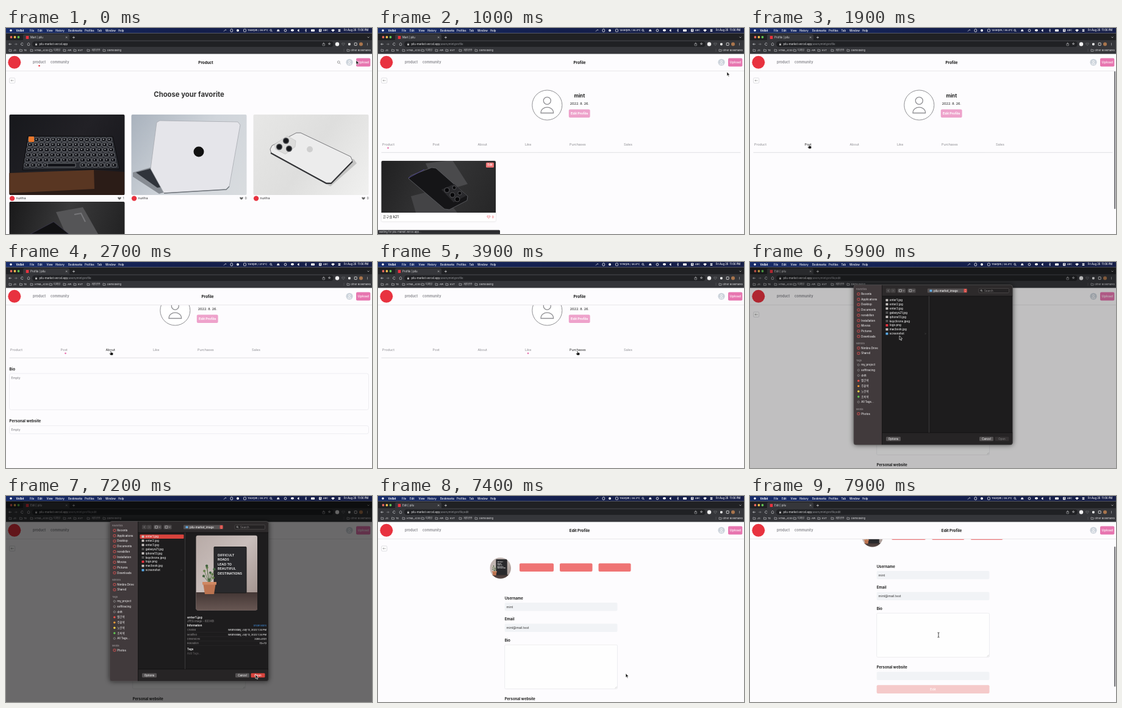
An HTML page with a canvas for the animation above (8 s loop, 600 px wide and 338 px high).

```html
<!DOCTYPE html>
<html lang="en">
<head>
<meta charset="utf-8">
<title>Market walkthrough</title>
<style>
html, body { margin: 0; width: 100%; height: 100%; overflow: hidden; background: #fdfcfe; }
canvas { display: block; width: 600px; height: 338px; }
</style>
</head>
<body>
<canvas id="stage"></canvas>
<script>
const W = 600, H = 338, LOOP = 8000;
const canvas = document.getElementById('stage');
const dpr = window.devicePixelRatio || 1;
canvas.width = W * dpr;
canvas.height = H * dpr;
const g = canvas.getContext('2d');

const USER = 'mint', SELLER = 'nuriha', SITE = 'pilu';
const PINK = '#e776b0', CORAL = '#ef7474', RED = '#e8323f', PAGE = '#fdfcfe';

// Drawing helpers
function text(s, x, y, size, color = '#222', weight = 400, align = 'left') {
  g.font = `${weight} ${size}px Inter, "Noto Sans CJK KR", "Noto Sans CJK", sans-serif`;
  g.textAlign = align;
  g.fillStyle = color;
  g.fillText(s, x, y + size * 0.35);
}
function paint(fill, stroke, width = 0.6) {
  if (fill) { g.fillStyle = fill; g.fill(); }
  if (stroke) { g.strokeStyle = stroke; g.lineWidth = width; g.stroke(); }
}
function box(x, y, w, h, r, fill, stroke, width) {
  g.beginPath();
  g.roundRect(x, y, w, h, r);
  paint(fill, stroke, width);
}
function dot(x, y, r, fill, stroke, width) {
  g.beginPath();
  g.arc(x, y, r, 0, 7);
  paint(fill, stroke, width);
}
function poly(points, fill, stroke, width) {
  g.beginPath();
  points.forEach(p => g.lineTo(p[0], p[1]));
  g.closePath();
  paint(fill, stroke, width);
}
function line(points, color, width = 0.7) {
  g.beginPath();
  points.forEach(p => g.lineTo(p[0], p[1]));
  paint(null, color, width);
}
function shade(x0, y0, x1, y1, ...colors) {
  const s = g.createLinearGradient(x0, y0, x1, y1);
  colors.forEach((c, i) => s.addColorStop(i / (colors.length - 1), c));
  return s;
}
function clipped(x, y, w, h, r, draw) {
  g.save();
  g.beginPath();
  g.roundRect(x, y, w, h, r);
  g.clip();
  draw();
  g.restore();
}
function shifted(x, y, draw) {
  g.save();
  g.translate(x, y);
  draw();
  g.restore();
}
function heart(x, y, s, fill, stroke) {
  g.beginPath();
  g.moveTo(x, y + s);
  g.bezierCurveTo(x - 2.2 * s, y - 0.4 * s, x - s, y - 1.6 * s, x, y - 0.5 * s);
  g.bezierCurveTo(x + s, y - 1.6 * s, x + 2.2 * s, y - 0.4 * s, x, y + s);
  paint(fill, stroke);
}
function magnifier(x, y, s, color) {
  dot(x - s * 0.2, y - s * 0.2, s * 0.7, null, color, 0.7);
  line([[x + s * 0.35, y + s * 0.35], [x + s, y + s]], color, 0.8);
}
function folder(x, y, color) {
  poly([[x, y - 1.6], [x + 1.6, y - 1.6], [x + 2.1, y - 1], [x + 4, y - 1], [x + 4, y + 1.7], [x, y + 1.7]], null, color, 0.55);
}

// Timing helpers
const last = (list, t) => list.filter(k => k[0] <= t).pop();
function track(keys, t) {
  const i = keys.findIndex(k => k[0] > t);
  if (i < 0) return keys[keys.length - 1].slice(1);
  if (i === 0) return keys[0].slice(1);
  const a = keys[i - 1], b = keys[i], u = (t - a[0]) / (b[0] - a[0]);
  const e = u * u * (3 - 2 * u);
  return a.slice(1).map((v, j) => v + (b[j + 1] - v) * e);
}

const CURSOR = [
  [0, 574, 53], [250, 563, 55], [600, 563, 55], [1000, 572, 72], [1650, 97, 191], [1900, 97, 191],
  [2250, 99, 150], [2500, 172, 146], [2800, 172, 146], [3000, 246, 146], [3650, 246, 146],
  [3900, 327, 146], [4150, 327, 146], [4400, 410, 146], [4550, 410, 146], [4780, 336, 144],
  [5100, 336, 144], [5400, 258, 117], [5650, 258, 117], [5900, 245, 121], [6300, 245, 121],
  [6600, 238, 66], [6850, 238, 66], [7200, 409, 293], [7350, 409, 293], [7850, 309, 228]
];
const CURSOR_KIND = [
  [0, 'arrow'], [200, 'hand'], [700, 'arrow'], [1600, 'hand'], [2050, 'arrow'], [2400, 'hand'],
  [4600, 'arrow'], [4740, 'hand'], [5150, 'arrow'], [5350, 'hand'], [5700, 'arrow'], [7700, 'beam']
];
const SCROLL = [[0, 0], [1900, 0], [2350, 47], [4560, 47], [4780, -1], [5100, -1], [5101, 0], [7500, 0], [7850, 52]];
const SENSOR = [
  [0, '1169rpm / 36.9°C'], [1000, '1209rpm / 36.4°C'], [2200, '1181rpm / 37.0°C'], [3300, '1179rpm / 36.8°C'],
  [4400, '1184rpm / 36.6°C'], [5500, '1158rpm / 36.4°C'], [6600, '1183rpm / 36.3°C'], [7700, '1183rpm / 38.3°C']
];
const TABS = [['Product', 7, 16.5], ['Post', 89.5, 97.5], ['About', 163.5, 171], ['Like', 241, 246], ['Purchases', 314, 327], ['Sales', 403, 409.5]];
const ACTIVE_TAB = [[0, 0], [1750, 1], [2800, 2], [3300, 3], [4050, 4], [4450, 5]];

// Photographs as flat shapes
function keyboardPhoto() {
  g.fillStyle = shade(6, 142, 194, 274, '#17181c', '#222126', '#15151a');
  g.fillRect(5, 142, 190, 133);
  poly([[5, 238], [144, 233], [194, 236], [194, 275], [5, 275]], '#2b1c17');
  poly([[5, 238], [144, 233], [145, 264], [5, 271]], '#593622');
  poly([[36, 177], [175, 178], [186, 231], [27, 233]], '#2b2d33', '#0c0c0e', 1);
  for (let row = 0; row < 6; row++) {
    const y = 180 + row * 8.4, x0 = 37 - row * 1.4, pitch = (138 + row * 3) / 15;
    for (let col = 0; col < 15; col++) {
      if (row === 5 && col > 3 && col < 9) continue;
      box(x0 + col * pitch, y, pitch - 1.8, 6, 1, '#111217', '#a9acb0', 0.6);
      g.fillStyle = '#d8dadc';
      g.fillRect(x0 + col * pitch + 2.3, y + 2, 2, 1.2);
    }
  }
  box(68, 222, 46, 6, 1, '#111217', '#a9acb0');
  box(37, 178, 9, 9, 1, '#ea772b');
}
function laptopPhoto() {
  g.fillStyle = shade(206, 142, 394, 274, '#a9b2bd', '#cfd4da', '#d9dcdf');
  g.fillRect(205, 142, 190, 133);
  poly([[208, 237], [240, 228], [262, 269], [251, 272], [208, 244]], '#878c93');
  poly([[213, 237], [240, 230], [255, 261], [248, 262]], '#30343b');
  poly([[247, 155], [252, 152], [380, 154], [384, 159], [366, 260], [361, 265], [259, 271], [237, 231]], '#e5e5ea', '#a7aab0', 0.8);
  line([[259, 271], [361, 265], [366, 260]], '#70757c', 1.4);
  dot(316, 203, 8.5, '#111');
}
function phonePhoto() {
  g.fillStyle = shade(406, 142, 594, 274, '#e7e7e6', '#dededd', '#f1f1f0');
  g.fillRect(405, 142, 190, 133);
  poly([[440, 210], [532, 260], [575, 222], [570, 215]], '#c4c4c3');
  poly([[433, 199], [436, 193], [476, 172], [483, 172], [565, 211], [568, 218], [533, 254], [525, 254], [435, 206]], '#ececec', '#77777a', 1);
  line([[434, 205], [525, 255], [533, 255], [568, 219]], '#333437', 2);
  poly([[440, 191], [461, 177], [475, 185], [474, 195], [458, 207], [442, 199]], '#dcdcdb', '#bbb');
  [[459, 185], [448, 195], [464, 198]].forEach(p => {
    dot(p[0], p[1], 5.2, '#55565a');
    dot(p[0], p[1], 3.8, '#17181b');
  });
  dot(498, 199, 5, '#cfcfcf');
}
function darkPhonePhoto() {
  g.fillStyle = shade(6, 218, 193, 303, '#202021', '#353536', '#262627');
  g.fillRect(5, 217, 190, 140);
  poly([[54, 276], [100, 264], [130, 303], [62, 303]], '#444446');
  poly([[78, 222], [122, 217], [147, 256], [100, 270]], '#4a4a4c');
  poly([[50, 247], [54, 242], [88, 229], [95, 230], [147, 276], [146, 283], [117, 298], [109, 297]], '#151517', '#5d5e62', 0.9);
  line([[50, 246], [76, 232]], '#4d438e', 1);
  poly([[104, 265], [125, 256], [145, 275], [124, 286]], '#29292c');
  [[113, 266], [122, 274], [130, 281], [125, 262], [134, 271]].forEach((p, i) => {
    dot(p[0], p[1], i < 3 ? 4 : 3, '#08080a', '#6b6b6d', 0.7);
  });
}
function deskPhoto() {
  g.fillStyle = shade(311, 64, 412, 160, '#b7aaa6', '#c9bebb', '#a49590');
  g.fillRect(311, 64, 102, 124);
  g.fillStyle = shade(0, 158, 0, 188, '#443735', '#685753');
  g.fillRect(311, 158, 102, 30);
  box(341, 83.5, 53, 75.5, 1, '#29292c', '#191919', 1);
  ['DIFFICULT', 'ROADS', 'LEAD TO', 'BEAUTIFUL', 'DESTINATIONS'].forEach((s, i) => text(s, 347, 97 + i * 7.5, 5.4, '#f2f2f2', 600));
  for (let i = 0; i < 9; i++) {
    const x = 333 + Math.sin(i * 2.3) * 9, y = 137 - i * 2.8;
    line([[333, 143], [x, y]], '#4e6b42', 0.8);
    dot(x, y, 2.1, i % 2 ? '#69834f' : '#41623f');
  }
  poly([[323, 142], [344, 142], [341, 161], [326, 161]], '#bb7350');
  g.fillStyle = '#cf8863';
  g.fillRect(322, 141, 23, 4.5);
}

// Menu bar, window tabs, toolbar and bookmarks
function browser(t, edit, profile) {
  g.fillStyle = shade(0, 0, W, 0, '#182d6b', '#141f4c', '#171f48');
  g.fillRect(0, 0, W, 8.5);
  dot(8, 4, 1.8, '#fff');
  text('Velbit', 16.5, 4, 4.6, '#fff', 700);
  [['File', 39], ['Edit', 52], ['View', 66.5], ['History', 81], ['Bookmarks', 102], ['Profiles', 129], ['Tab', 149.5], ['Window', 163], ['Help', 184]]
    .forEach(m => text(m[0], m[1], 4, 4.3, '#fff', 500));
  line([[357, 5.5], [360, 2.5], [361, 4]], '#fff');
  box(368, 1.8, 3.6, 4.5, 1.5, null, '#fff', 0.8);
  dot(380, 4, 2, '#fff');
  box(389.5, 2, 4, 4, 0.6, null, '#fff', 0.7);
  text(last(SENSOR, t)[1], 396, 4, 4.1, '#fff', 500);
  magnifier(434.5, 4, 2, '#fff');
  poly([[444, 5.5], [445, 2.5], [447.5, 2.5], [448.5, 5.5]], '#fff');
  dot(458, 4, 1.9, null, '#fff', 0.8);
  box(467, 2, 5, 3.5, 1.7, '#fff');
  poly([[478, 3.2], [480.5, 1.8], [480.5, 6.2], [478, 4.8]], '#fff');
  line([[490, 2.8], [493, 5.2], [491.5, 6.4], [491.5, 1.6], [493, 2.8], [490, 5.2]], '#fff', 0.5);
  box(500, 2.2, 6, 3.5, 0.7, '#fff');
  box(513, 1.7, 4.3, 4.5, 0.6, '#fff');
  text('A', 515.2, 4, 3.5, '#18204a', 600, 'center');
  text('ABC', 520, 4, 3.8, '#fff', 500);
  g.beginPath();
  g.moveTo(536, 6.3);
  g.arc(536, 6.3, 4, -2.4, -0.74);
  paint('#fff');
  box(544.5, 2, 4, 1.6, 0.8, '#fff');
  box(544.5, 4.3, 4, 1.6, 0.8, '#fff');
  text('Fri Aug 26  11:06 PM', 554, 4, 4.15, '#fff', 500);

  g.fillStyle = '#202124';
  g.fillRect(0, 8.5, W, 12);
  g.fillStyle = '#35363a';
  g.fillRect(0, 20, W, 22.5);
  ['#ed6a5e', '#f5bf4f', '#61c554'].forEach((c, i) => dot(8.5 + i * 6, 15, 1.9, c));
  box(28, 10.2, 76, 12, [2.5, 2.5, 0, 0], '#35363a');
  box(32.7, 13, 4.6, 5, 0.5, RED);
  const title = edit ? 'Edit' : t >= 1300 ? 'Profile' : 'Mart';
  text(`${title} | ${SITE}`, 40, 15.6, 4.4, '#e4e5e7');
  line([[98, 14.2], [100.4, 16.6]], '#ddd', 0.6);
  line([[100.4, 14.2], [98, 16.6]], '#ddd', 0.6);
  line([[109, 15.5], [113, 15.5]], '#ddd');
  line([[111, 13.5], [111, 17.5]], '#ddd');
  line([[592.5, 14.5], [594, 16], [595.5, 14.5]], '#ddd');

  const ink = '#d5d6d8';
  line([[9, 26.5], [4.8, 26.5], [6.6, 24.7]], ink);
  line([[4.8, 26.5], [6.6, 28.3]], ink);
  line([[14, 26.5], [18, 26.5], [16.3, 24.7]], '#85868a');
  line([[18, 26.5], [16.3, 28.3]], '#85868a');
  g.beginPath();
  g.arc(26.5, 26.5, 2, 0.5, 5.7);
  paint(null, ink, 0.7);
  poly([[35, 26], [37, 24], [39, 26], [38.3, 28.6], [35.7, 28.6]], null, ink);
  box(43, 22, 494, 9, 4.5, '#202124');
  box(48, 26, 3, 2.5, 0.3, '#bbb');
  dot(49.5, 25.8, 1, null, '#bbb', 0.5);
  const host = `${SITE}-market.vercel.app`;
  text(host, 54.5, 26.6, 4.4, '#f0f0f1');
  const end = 54.5 + g.measureText(host).width;
  if (profile) text(`/users/${USER}/profile${edit ? '/edit' : ''}`, end, 26.6, 4.4, '#9a9ca0');
  box(519, 25.4, 3.5, 3.5, 0.3, null, ink, 0.5);
  line([[520.7, 27], [520.7, 23.5]], ink, 0.5);
  text('☆', 530, 26.3, 5.5, ink, 400, 'center');
  dot(543, 26.5, 3.2, '#f0f0f0');
  heart(553, 26.5, 1.9, null, '#85868a');
  box(561, 24.7, 3.7, 3.7, 0.8, '#eee');
  box(571.2, 24.4, 4, 4.2, 0.5, null, '#eee', 0.8);
  dot(582, 26.5, 3, '#a9754c');
  for (let i = -1; i < 2; i++) dot(592.5, 26.5 + i * 1.6, 0.5, ink);
  [['JS', 5, 12], ['TE', 22.5, 29], ['HTML,JCSS', 40, 47], ['디자인', 71.5, 78], ['API', 94, 101], ['KVT', 111, 118], ['개인공부', 133, 140], ['DBmodeling', 159, 166]]
    .forEach(b => { folder(b[1], 36.6, ink); text(b[0], b[2], 36.8, 4, '#e6e6e8'); });
  line([[554, 34], [554, 39]], '#66676a', 0.5);
  folder(559, 36.6, ink);
  text('Other Bookmarks', 565, 36.8, 4, '#e6e6e8');
}

function header(title, products) {
  g.fillStyle = PAGE;
  g.fillRect(0, 42.3, W, 28.2);
  line([[0, 70.5], [W, 70.5]], '#e6e4e8', 0.8);
  dot(13.8, 56.3, 10.5, RED);
  text('product', 44, 56.3, 5.6, '#85858a', 600);
  text('community', 73, 56.3, 5.6, '#85858a', 600);
  if (products) {
    dot(54.5, 62, 1.3, RED);
    magnifier(545.8, 56.5, 2.7, '#777');
  }
  text(title, products ? 327.5 : 330.5, 56.4, 6.3, '#111', 700, 'center');
  dot(563, 56.3, 5.6, '#cdd4dc');
  dot(563, 54.9, 1.5, null, '#fff', 0.7);
  box(560.6, 57.4, 4.8, 2.4, [2, 2, 0, 0], null, '#fff', 0.7);
  box(574, 49.5, 23.3, 13.7, 2, PINK);
  text('Upload', 585.7, 56.4, 5.4, '#fff', 500, 'center');
}
function backButton() {
  box(5.7, 82, 9, 8.4, 1.4, '#fff', '#c9c9ce');
  line([[12.5, 86.2], [8, 86.2], [9.4, 84.9]], '#777', 0.6);
  line([[8, 86.2], [9.4, 87.5]], '#777', 0.6);
}

// Pages
function productsPage() {
  backButton();
  text('Choose your favorite', 300, 109, 11.3, '#333', 700, 'center');
  [keyboardPhoto, laptopPhoto, phonePhoto].forEach((photo, i) => {
    const x = 5.5 + i * 200;
    clipped(x, 142, 189, 132, 2, photo);
    dot(x + 4.6, 279.6, 4.2, RED);
    text(SELLER, x + 11, 279.6, 5.4, '#333');
    heart(x + 180.5, 279.6, 2.2, '#666');
    text(i ? '0' : '1', x + 186, 279.6, 5.2, '#444');
  });
  clipped(5.5, 285, 189, 60, 2, () => {
    g.fillStyle = shade(6, 285, 194, 338, '#19191a', '#3a3a3b', '#222223');
    g.fillRect(5, 285, 190, 60);
    poly([[82, 302], [126, 294], [151, 338], [98, 338]], '#555557');
    poly([[40, 338], [78, 318], [103, 338]], '#111113', '#45405f');
    line([[112, 306], [123, 304], [130, 318]], '#77777a', 2);
  });
}
function profilePage(t, cursor, scroll) {
  backButton();
  dot(277.3, 126.5, 24.5, '#fff', '#8e8e92', 1);
  dot(277.3, 119.3, 6, null, '#8e8e92', 1.3);
  g.beginPath();
  g.moveTo(267, 139.5);
  g.bezierCurveTo(267, 127, 287.6, 127, 287.6, 139.5);
  g.closePath();
  paint(null, '#8e8e92', 1.3);
  text(USER, 330.3, 111.5, 8.2, '#222', 700, 'center');
  text('2022. 8. 26.', 330.3, 123.8, 5.4, '#333', 500, 'center');
  box(312.8, 133.6, 34.8, 13.4, 2, '#eea2cb');
  text('Edit Profile', 330.2, 140.4, 5.4, '#fff', 700, 'center');
  const active = last(ACTIVE_TAB, t)[1];
  TABS.forEach(([label, x, center]) => {
    const hover = Math.abs(cursor[1] + scroll - 192) < 6 && Math.abs(cursor[0] - center) < 12;
    text(label, x, 191.2, 5.4, hover ? '#222' : '#8b8b90');
  });
  dot(TABS[active][2], 196.8, 1.4, PINK);
  line([[5.5, 204.3], [594.5, 204.3]], '#d8d8dc', 0.8);
  if (active === 0) {
    g.save();
    g.shadowColor = '#0003';
    g.shadowBlur = 2;
    box(5.5, 218, 187.5, 99.5, 2, '#fff');
    g.restore();
    clipped(5.5, 218, 187.5, 85, [2, 2, 0, 0], darkPhonePhoto);
    box(177, 220.7, 13, 8.3, 1.5, CORAL);
    text('Edit', 183.5, 224.9, 4.3, '#fff', 600, 'center');
    text('은구슬 k21', 8.3, 310, 5.5, '#222', 500);
    heart(181.4, 310, 2, null, RED);
    text('0', 186.7, 310, 5, RED);
  }
  if (t >= 2700 && t < 3300) {
    text('Bio', 5.5, 222.5, 6.2, '#222', 700);
    box(5.5, 230, 589, 59.5, 3, null, '#e3e3e7');
    text('Empty', 8.5, 237.3, 5, '#75757a');
    text('Personal website', 5.5, 308.2, 6.2, '#222', 700);
    box(5.5, 315.6, 589, 13.2, 3, null, '#e3e3e7');
    text('Empty', 8.5, 322.6, 5, '#75757a');
  }
}
function editPage(t) {
  backButton();
  if (t >= 7400) {
    clipped(183.4, 101, 34.6, 34.6, 17.3, () => shifted(183.4 - 311 * 0.34, 101 - 75 * 0.34, () => {
      g.scale(0.34, 0.34);
      deskPhoto();
    }));
  } else {
    dot(200.7, 118.3, 17.3, '#fff', '#8e8e92', 0.8);
    dot(200.7, 113.5, 4, null, '#8e8e92', 0.9);
    box(193.7, 120.5, 14, 7, [7, 7, 0, 0], null, '#8e8e92', 0.9);
  }
  [[232, 56], [298, 53.5], [361.5, 53]].forEach(b => box(b[0], 110.5, b[1], 13.5, 2, CORAL));
  [['Username', 167.5, USER], ['Email', 202, USER + '@mail.test'], ['Personal website', 333, '']].forEach(([label, y, value]) => {
    text(label, 207.7, y, 6, '#222', 700);
    box(207.7, y + 7.5, 184.8, 13.5, 2, '#f1f3f6');
    text(value, 210.5, y + 14.4, 5.3, '#333');
  });
  text('Bio', 207.7, 236.4, 6, '#222', 700);
  box(207.7, 244.2, 184.8, 72.3, 2, '#fefefe', '#e2e2e6');
  line([[388.6, 315.5], [391.5, 312.6]], '#999', 0.4);
  line([[390.2, 315.5], [391.5, 314.2]], '#999', 0.4);
  box(207.7, 362.3, 184.8, 13.6, 2, '#f5caca');
  text('Edit', 300, 369.2, 5.2, '#fff', 500, 'center');
}

// File chooser, placed at its resting position
function sideItem(label, y, icon) {
  if (icon === 'ring') dot(177.8, y, 1.6, null, '#aaa', 0.6);
  else if (icon) dot(177.8, y, 1.7, icon);
  else box(176, y - 1.8, 3.8, 3.6, 0.8, null, '#ee5555', 0.8);
  text(label, 182.3, y, 4.4, '#e8e6e7', 500);
}
function fileDialog(selected) {
  g.save();
  g.shadowColor = '#000a';
  g.shadowBlur = 8;
  box(170, 41.5, 260.5, 262.5, 4, '#1d1c1d');
  g.restore();
  clipped(170, 41.5, 260.5, 262.5, 4, () => {
    g.fillStyle = '#413a3c';
    g.fillRect(170, 41, 46.5, 264);
    g.fillStyle = '#2d2a2b';
    g.fillRect(216.5, 41, 215, 19);
    g.fillStyle = '#262425';
    g.fillRect(216.5, 284, 215, 21);
    line([[216.5, 60], [431, 60]], '#0d0d0d');
    line([[216.5, 284], [431, 284]], '#0d0d0d');
    line([[216.5, 41], [216.5, 305]], '#111');
    line([[293.5, 60], [293.5, 284]], '#4a4849');
  });
  box(170, 41.5, 260.5, 262.5, 4, null, '#666', 0.5);
  [['Favorites', 49], ['Nimbra', 138], ['Tags', 165.8], ['Media', 245.5]].forEach(h => text(h[0], 174, h[1], 3.9, '#918b8d', 600));
  ['Recents', 'Applications', 'Desktop', 'Documents', 'norabillen', 'Installation', 'Movies', 'Pictures', 'Downloads']
    .forEach((s, i) => sideItem(s, 56.5 + i * 8.7));
  sideItem('Nimbra Drive', 145.2);
  sideItem('Shared', 153.9);
  [['my_project', 'ring'], ['softtracing', 'ring'], ['drift', 'ring'], ['빨간색', '#ff524b'], ['주황색', '#f79a36'], ['노란색', '#f7cf45'], ['초록색', '#61c852'], ['All Tags...', 'ring']]
    .forEach((s, i) => sideItem(s[0], 172.8 + i * 8.7, s[1]));
  sideItem('Photos', 253);

  box(223, 47.5, 7.5, 7, 1.2, '#454243');
  box(231, 47.5, 7.5, 7, 1.2, '#454243');
  line([[227.4, 49.6], [226, 51], [227.4, 52.4]], '#999');
  line([[234, 49.6], [235.4, 51], [234, 52.4]], '#777');
  [242, 258.5].forEach(x => {
    box(x, 47.5, 13, 7, 1.2, '#4e4b4c');
    box(x + 2.5, 49.2, 4, 3.6, 0.4, null, '#ddd');
    line([[x + 8.8, 50.5], [x + 9.8, 51.5], [x + 10.8, 50.5]], '#ddd');
  });
  box(291, 47.4, 65, 7.2, 1.4, '#555152');
  box(350.5, 47.9, 5, 6.2, 1.1, '#d94740');
  line([[352, 50.4], [353, 49.3], [354, 50.4]], '#fff', 0.5);
  line([[352, 51.8], [353, 52.9], [354, 51.8]], '#fff', 0.5);
  box(294.5, 49.5, 4, 3.2, 0.5, '#62aee8');
  text(SITE + '-market_image', 301, 51, 4.5, '#eee', 500);
  box(375, 47.4, 49.5, 7.2, 1.4, '#252324', '#5a5657');
  magnifier(379.5, 51, 1.6, '#bbb');
  text('Search', 384, 51, 4.4, '#908c8d');

  if (selected) box(219.5, 63.2, 72, 6.8, 1, '#d8433d');
  ['enter1.jpg', 'enter2.jpg', 'enter3.jpg', 'galaxys21.jpg', 'iphone13.jpg', 'keychrone.jpeg', 'logo.png', 'macbook.jpg', 'screenshot'].forEach((s, i) => {
    const y = 66.6 + i * 6.87;
    box(222.5, y - 1.9, 4, 3.8, 0.4, i === 8 ? '#58aae8' : i === 6 ? RED : i === 3 || i === 5 ? '#555' : '#c7c2c0');
    text(s, 228.8, y, 4.5, '#eee', 500);
  });
  line([[287, 120.6], [288, 121.6], [287, 122.6]], '#777', 0.5);
  box(223, 290.8, 24, 7, 1.4, '#555253');
  text('Options', 235, 294.3, 4.4, '#eee', 500, 'center');
  box(376, 290.8, 23, 7, 1.4, '#555253');
  text('Cancel', 387.5, 294.3, 4.4, '#eee', 500, 'center');
  box(401.5, 290.8, 23, 7, 1.4, selected ? '#d8433d' : '#343132');
  text('Open', 413, 294.3, 4.4, selected ? '#fff' : '#777', 500, 'center');
  if (!selected) return;

  clipped(311.5, 64.7, 100.5, 122.8, 3, deskPhoto);
  text('enter1.jpg', 297, 198.8, 5.2, '#f4f4f4', 600);
  text('JPEG image - 833 KB', 297, 205.6, 4.3, '#9b9899');
  text('Information', 297, 212.8, 4.3, '#eee', 700);
  text('Show More', 427, 212.8, 4, '#4295e8', 400, 'right');
  const stamp = 'Wednesday, July 13, 2022 1:34 PM';
  [['Created', stamp], ['Modified', stamp], ['Dimensions', '3355×5131'], ['Resolution', '72×72']].forEach((r, i) => {
    const y = 220 + i * 7.2;
    text(r[0], 297, y, 3.8, '#9b9899');
    text(r[1], 427, y, 3.8, '#eee', 500, 'right');
    line([[297, y + 3.6], [427, y + 3.6]], '#343233', 0.4);
  });
  text('Tags', 297, 251.2, 4.3, '#eee', 700);
  text('Add Tags...', 297, 258.3, 4.2, '#666364');
}

function drawCursor(kind, x, y) {
  shifted(x, y, () => {
    if (kind === 'arrow') {
      poly([[0, 0], [0, 6.7], [1.5, 5.3], [2.6, 7.8], [3.7, 7.3], [2.6, 4.9], [4.7, 4.9]], '#111', '#fff', 0.6);
    } else if (kind === 'hand') {
      poly([[-0.8, -0.6], [0.5, -0.6], [0.7, 2.4], [3.6, 3], [3.8, 5.2], [3, 7], [-0.6, 7], [-2.5, 4.2], [-1.8, 3.4], [-0.7, 4.2]], '#111', '#fff', 0.6);
    } else {
      line([[-1.5, -4], [0, -3.4], [1.5, -4]], '#333', 0.9);
      line([[0, -3.4], [0, 3.4]], '#333', 0.9);
      line([[-1.5, 4], [0, 3.4], [1.5, 4]], '#333', 0.9);
    }
  });
}

function render(t) {
  const cursor = track(CURSOR, t), scroll = track(SCROLL, t)[0];
  const profile = t >= 500, edit = t >= 5100;
  g.setTransform(dpr, 0, 0, dpr, 0, 0);
  g.fillStyle = PAGE;
  g.fillRect(0, 0, W, H);
  shifted(0, -scroll, () => {
    if (edit) editPage(t);
    else if (profile) profilePage(t, cursor, scroll);
    else productsPage();
  });
  header(edit ? 'Edit Profile' : profile ? 'Profile' : 'Product', !profile);
  if ((t > 1900 && t < 2500) || (t > 4580 && t < 5100) || t > 7520) {
    box(597, 71 + Math.max(0, scroll) * 0.23, 2.2, edit ? 230 : 226, 1.1, '#77777b');
  }
  if (t >= 500 && t < 1400) {
    box(0, 331.5, 200, 7, [0, 1.5, 0, 0], '#2c2d30');
    text(`Waiting for ${SITE}-market.vercel.app...`, 1.5, 335, 4.1, '#e4e4e6');
  }
  browser(t, edit, profile);
  const dim = track([[0, 0], [5700, 0], [6150, 0.58], [7250, 0.58], [7400, 0]], t)[0];
  if (dim) {
    g.fillStyle = `rgba(0,0,0,${dim})`;
    g.fillRect(0, 8.5, W, H);
  }
  if (t >= 5750 && t < 7300) {
    const drop = track([[5750, -16], [5900, -4], [6050, 0]], t)[0];
    shifted(0, drop, () => fileDialog(t >= 6650));
  }
  drawCursor(last(CURSOR_KIND, t)[1], cursor[0], cursor[1]);
}

const start = performance.now();
function tick() {
  render((performance.now() - start) % LOOP);
  requestAnimationFrame(tick);
}
tick();
</script>
</body>
</html>
```
